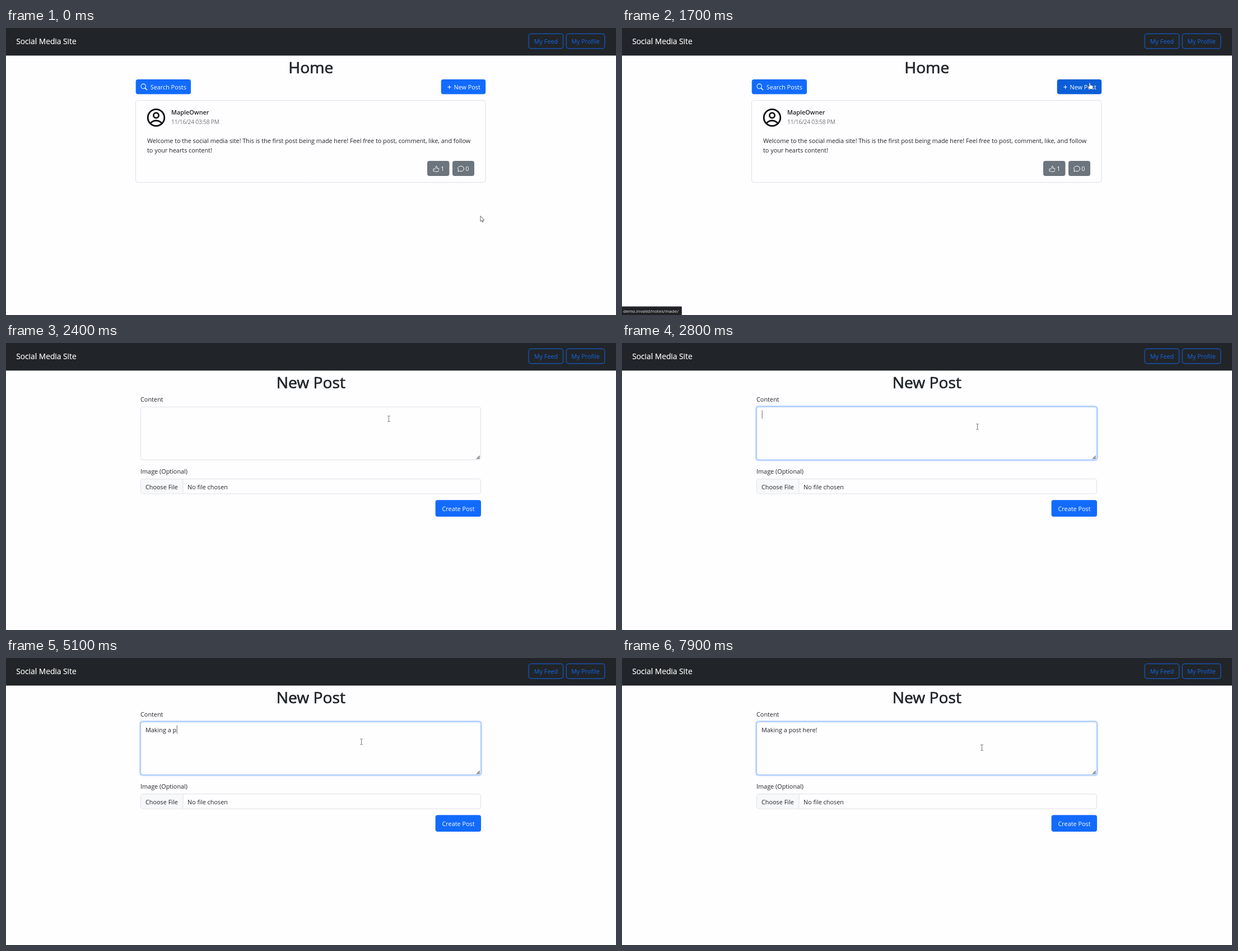
Recreate the animation shown at these times as an HTML page with a canvas. Size 1089x514 px, loop 8 s.

```html
<!DOCTYPE html>
<html lang="en">
<head>
<meta charset="utf-8">
<title>Social Media Site</title>
<style>
  html, body { margin: 0; width: 100%; height: 100%; overflow: hidden; background: #fefdff; }
  canvas { display: block; width: 1089px; height: 514px; }
</style>
</head>
<body>
<canvas id="stage" width="1089" height="514"></canvas>
<script>
const ctx = document.getElementById('stage').getContext('2d');
const LOOP = 8000, STEP = 100;
const PAGE_LOAD = 1800, FOCUS = 2600;
const PAPER = '#fefdff', INK = '#212529', BLUE = '#126bfd', GRAY = '#6c757d', LINE = '#dfe0e3';
const MESSAGE = 'Making a post here!';

// Keys are [time, ...values]
const POINTER = [[0, 847, 337], [200, 847, 337], [1050, 835, 98], [1800, 835, 98], [2000, 823, 95],
  [2600, 634.5, 150], [7400, 634.5, 150], [7900, 642.5, 160.5]];
const TYPING = [[0, 0], [3360, 0], [4060, 5], [6150, 16], [7000, 19]];

const clamp = v => Math.max(0, Math.min(1, v));
const smooth = v => v * v * (3 - 2 * v);
const linear = v => v;

function sample(keys, t, ease) {
  const next = keys.findIndex(key => key[0] > t);
  if (next < 0) return keys[keys.length - 1].slice(1);
  const from = keys[next - 1], to = keys[next];
  const p = ease((t - from[0]) / (to[0] - from[0]));
  return from.slice(1).map((v, i) => v + (to[i + 1] - v) * p);
}

function mix(a, b, p) {
  return `rgb(${a.map((v, i) => Math.round(v + (b[i] - v) * p)).join(',')})`;
}

// heft thickens the letters for a weight between regular and semibold
function text(str, x, y, { size = 10.85, weight = 400, color = INK, align = 'left', tracking = 0, heft = 0 } = {}) {
  ctx.font = `${weight} ${size}px "Open Sans", "Noto Sans", sans-serif`;
  ctx.letterSpacing = tracking + 'px';
  ctx.textAlign = align;
  ctx.fillStyle = color;
  ctx.fillText(str, x, y);
  if (heft) {
    ctx.strokeStyle = color;
    ctx.lineWidth = heft;
    ctx.lineJoin = 'round';
    ctx.strokeText(str, x, y);
  }
}

function heading(str) {
  text(str, 544.3, 81, { size: 28.2, align: 'center', heft: 0.7 });
}

function box(x, y, w, h, { fill, stroke, radius = 4, width = 1 } = {}) {
  ctx.beginPath();
  ctx.roundRect(x, y, w, h, radius);
  if (fill) { ctx.fillStyle = fill; ctx.fill(); }
  if (stroke) { ctx.strokeStyle = stroke; ctx.lineWidth = width; ctx.stroke(); }
}

function path(d, { x = 0, y = 0, fill, stroke, width = 1 }) {
  const shape = new Path2D(d);
  ctx.save();
  ctx.translate(x, y);
  ctx.lineCap = ctx.lineJoin = 'round';
  if (fill) { ctx.fillStyle = fill; ctx.fill(shape); }
  if (stroke) { ctx.strokeStyle = stroke; ctx.lineWidth = width; ctx.stroke(shape); }
  ctx.restore();
}

function ring(x, y, r, width, color) {
  ctx.beginPath();
  ctx.arc(x, y, r, 0, Math.PI * 2);
  ctx.strokeStyle = color;
  ctx.lineWidth = width;
  ctx.stroke();
}

function drawNav() {
  ctx.fillStyle = INK;
  ctx.fillRect(0, 0, 1089, 49.4);
  text('Social Media Site', 18.2, 28.7, { size: 13.75, color: '#fafafa', heft: 0.2 });
  const link = '#1465e6';
  box(933.2, 10.3, 61.5, 26.5, { stroke: link });
  box(1000.3, 10.3, 68.6, 26.5, { stroke: link });
  text('My Feed', 964, 28, { color: link, align: 'center' });
  text('My Profile', 1034.5, 28, { color: link, align: 'center' });
}

function drawAvatar(x, y) {
  ring(x, y, 14.8, 2.8, '#0b0b0c');
  ring(x, y - 4, 4.6, 2.8, '#0b0b0c');
  path('M-10 10Q-6 5.3 0 5.3Q6 5.3 10 10', { x, y, stroke: '#0b0b0c', width: 2.8 });
}

function drawHome(t) {
  heading('Home');

  box(231.7, 92, 98.3, 26.5, { fill: BLUE });
  ring(245.2, 104.3, 4.2, 1.1, '#fff');
  path('M248.3 107.5L251.5 110.7', { stroke: '#fff', width: 1.6 });
  text('Search Posts', 257.7, 110, { color: '#fff' });

  const hover = clamp((t - 980) / 200);
  box(776.7, 92, 79.5, 26.5, { fill: mix([18, 107, 253], [11, 94, 215], hover) });
  path('M788.7 105.8H794.3M791.5 103V108.6', { stroke: '#fff' });
  text('New Post', 799.5, 110, { color: '#fff' });

  box(231.5, 129.5, 624.5, 147, { stroke: LINE });
  drawAvatar(268, 160.5);
  text('MapleOwner', 295, 155, { weight: 600 });
  text('11/16/24 03:58 PM', 295, 172, { size: 10.3, color: '#73777b', tracking: -0.25 });
  text('Welcome to the social media site! This is the first post being made here! ' +
    'Feel free to post, comment, like, and follow', 252, 206, { size: 10.8 });
  text('to your hearts content!', 252, 223);

  box(752, 238, 39.5, 27, { fill: GRAY });
  path('M-4.5 0H-2.2C-.8-1-.5-3-.3-5C1.7-5.2 1.9-3 1.3-1H4C5.2-.8 5 .8 4.4 1.2C4.8 2 4.5 2.8 4 3.2' +
    'C4.1 4.4 3.5 5 2.5 5H-.5C-2 5-2.5 4.2-4.5 4.2Z', { x: 768, y: 252.3, stroke: '#fff' });
  text('1', 776.3, 256, { color: '#fff' });
  box(797, 238, 39, 27, { fill: GRAY });
  path('M-4.2 2.6C-7-1-4-4.7 0-4.7C3.2-4.7 5.5-2.6 5.5 0C5.5 2.8 2.8 4.7 0 4.7C-1 4.7-1.8 4.5-2.5 4.2' +
    'C-3.3 4.8-4.3 5-5.2 5Q-4.2 4-4.2 2.6Z', { x: 812, y: 252, stroke: '#fff' });
  text('0', 820.3, 256, { color: '#fff' });
}

function typedCount(t) {
  return Math.floor(sample(TYPING, t, linear)[0]);
}

function drawCaret(t, count) {
  let lastKey = FOCUS;
  for (let s = FOCUS; s <= t; s += STEP) {
    if (typedCount(s) > typedCount(s - STEP)) lastKey = s;
  }
  if (Math.floor((t - lastKey) / 500) % 2) return;
  const x = 249.5 + ctx.measureText(MESSAGE.slice(0, count)).width;
  ctx.fillStyle = '#6a6c70';
  ctx.fillRect(Math.round(x) - 0.3, 120.5, 1, 15);
}

function drawForm(t) {
  heading('New Post');
  text('Content', 240, 105);

  const focus = clamp((t - FOCUS + STEP) / 200);
  if (focus) {
    ctx.globalAlpha = focus;
    box(237.8, 112, 612.2, 99.4, { fill: '#c2dafe', radius: 6 });
    ctx.globalAlpha = 1;
  }
  box(240.5, 114.5, 607, 94.5, { fill: PAPER, stroke: mix([223, 224, 227], [158, 196, 254], focus) });
  path('M840.5 207.5L845.5 202.5M843.5 207.5L845.5 205.5', { stroke: '#55585c', width: 1.1 });

  const count = typedCount(t);
  text(MESSAGE.slice(0, count), 249, 132.7);
  if (t >= FOCUS) drawCaret(t, count);

  text('Image (Optional)', 240, 234);
  box(240.5, 243.5, 607, 26.5, { stroke: LINE });
  box(241, 244, 75, 25.5, { fill: '#f7f8fa', radius: [3, 0, 0, 3] });
  ctx.fillStyle = LINE;
  ctx.fillRect(315.5, 244, 1, 25.5);
  text('Choose File', 249, 261.7);
  text('No file chosen', 324, 261.7);

  box(766.6, 281.2, 81.4, 29.8, { fill: BLUE });
  text('Create Post', 807.5, 300.7, { color: '#fff', align: 'center' });
}

function drawStatus() {
  box(-1, 499, 107.5, 17, { fill: '#202124', stroke: '#4b4d50', radius: 1 });
  text('demo.invalid/notes/made/', 2, 510, { size: 8, color: '#e6e6e8' });
}

function drawPointer(t) {
  const [x, y] = sample(POINTER, t, smooth);
  const inside = (l, top, r, b) => x > l && x < r && y > top && y < b;
  if (t < PAGE_LOAD && inside(777, 92, 856, 118)) {
    path('M-1 .8Q0-.8 1 .8V4.2L5 5.2Q6.2 5.8 5.7 8L4.8 11.5H0L-3.2 7.2Q-3.3 5.7-1.9 6.2L-1 7Z',
      { x, y, fill: '#fff', stroke: '#4a4d55', width: 0.7 });
  } else if (t >= PAGE_LOAD && inside(240, 114, 848, 209)) {
    path('M-2-5H-.7L0-4.5L.7-5H2M0-4.5V4.5M-2 5H-.7L0 4.5L.7 5H2', { x, y, stroke: '#65676b', width: 0.9 });
  } else {
    path('M0 0V9.6L2.2 7.6L3.7 10.8L5 10.2L3.6 7.1H6.4Z', { x, y, fill: '#fff', stroke: '#55575d', width: 0.9 });
  }
}

function render(now) {
  const t = Math.floor((now % LOOP) / STEP) * STEP;
  ctx.fillStyle = PAPER;
  ctx.fillRect(0, 0, 1089, 514);
  drawNav();
  if (t < PAGE_LOAD) drawHome(t);
  else drawForm(t);
  if (t >= 1300 && t < 2200) drawStatus();
  drawPointer(t);
}

let start;
function tick(now) {
  start ??= now;
  render(now - start);
  requestAnimationFrame(tick);
}
render(0);
requestAnimationFrame(tick);
</script>
</body>
</html>
```
